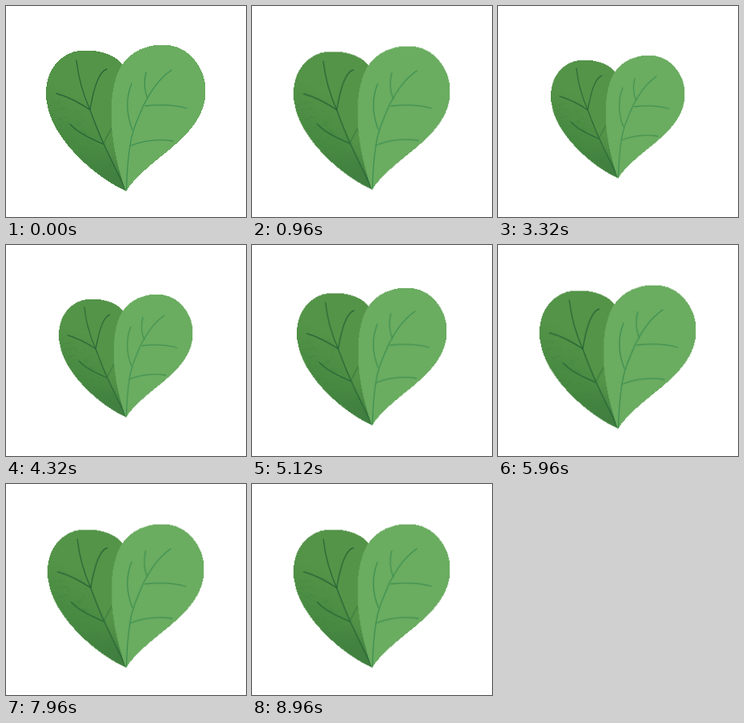
Write an HTML page that moves like this. It is 300 by 264 pixels and loops after 9000 ms.

```html
<!DOCTYPE html>
<html lang="en">
<head>
<meta charset="utf-8">
<title>Beating leaf heart</title>
<style>
  html, body { margin: 0; width: 100%; height: 100%; overflow: hidden; background: #fff; }
  svg { display: block; width: 300px; height: 264px; }
  #heart { transform-origin: 150px 131px; }
  .leaf { stroke-width: 1; stroke-linejoin: round; shape-rendering: crispEdges; }
  .veins { fill: none; stroke-width: 1.3; stroke-linecap: round; }
</style>
</head>
<body>
<svg viewBox="0 0 300 264">
  <defs>
    <linearGradient id="shade" gradientUnits="userSpaceOnUse" x1="112" y1="118" x2="82" y2="184">
      <stop offset="0" stop-color="#42843f" stop-opacity="0"/>
      <stop offset="1" stop-color="#42843f" stop-opacity=".75"/>
    </linearGradient>
    <linearGradient id="base" gradientUnits="userSpaceOnUse" x1="125" y1="170" x2="142" y2="230">
      <stop offset="0" stop-color="#3d7a40" stop-opacity="0"/>
      <stop offset="1" stop-color="#3d7a40" stop-opacity=".75"/>
    </linearGradient>
    <path id="left" d="M150 231C112 214 50.500 162 50.500 109C50.500 78 71 56 99 56C119 56 136 62 146 74L160 120Z"/>
    <clipPath id="leftClip"><use href="#left"/></clipPath>
  </defs>
  <g id="heart">
    <use class="leaf" href="#left" fill="#549448" stroke="#509146"/>
    <g clip-path="url(#leftClip)">
      <path d="M40 60H88Q93 102 105 130L122 172L150 231V264H40Z" fill="url(#shade)"/>
      <path d="M40 150H170V264H40Z" fill="url(#base)"/>
      <path id="grain" fill="none" stroke="#37773a" stroke-width=".7" opacity=".3"/>
    </g>
    <g class="veins" stroke="#266637">
      <path d="M88 68C91 94 97 112 105 130C111 146 116 159 122 172C131 192 141 211 150 231"/>
      <path d="M126 79C115 82 109 106 105 130"/>
      <path d="M63 109.500C79 114 92 121 105 130"/>
      <path d="M80 148C92 160 106 166 122 173"/>
      <path d="M133 151Q127 161 122 172" stroke="#3a7d40"/>
    </g>
    <path class="leaf" fill="#6aac60" stroke="#6aac60" d="M150 231C139 199 131.500 163 132 130C132.500 106 138 84 146 73C157 57 176 49 196 49C227 49 249 76 249 107C249 136 230 157 208 176C185 195 162 212 150 231Z"/>
    <g class="veins" stroke="#3e9052">
      <path d="M207 80C190 92 181 107 172 124C163 145 157 158 155 175C152 193 151 211 150.500 230"/>
      <path d="M175 83C172 95 173 106 177 116"/>
      <path d="M157 97C149 117 151 137 158 155"/>
      <path d="M174 125C192 123 209 123 226 128"/>
      <path d="M155 175C173 168 190 166 209 169"/>
    </g>
  </g>
</svg>
<script>
  // Faint brush grain on the shaded side of the back leaf.
  let seed = 11;
  const rand = () => (seed = seed * 16807 % 2147483647) / 2147483647;
  let strokes = '';
  for (let i = 0; i < 110; i++) {
    const y = 118 + 105 * rand();
    const mid = 105 + (y - 130) * 0.44;
    const x = mid - 52 * Math.sqrt(rand());
    strokes += `M${x.toFixed(1)} ${y.toFixed(1)}l${(2 + 5 * rand()).toFixed(1)} 2`;
  }
  document.getElementById('grain').setAttribute('d', strokes);

  // One beat: 25 even steps of 40 ms, shrinking and then growing.
  document.getElementById('heart').animate([
    { transform: 'scale(1)', offset: 0, easing: 'steps(12)' },
    { transform: 'scale(.76)', offset: 0.48, easing: 'steps(13)' },
    { transform: 'scale(1)', offset: 1 }
  ], { duration: 1000, iterations: Infinity });
</script>
</body>
</html>
```
